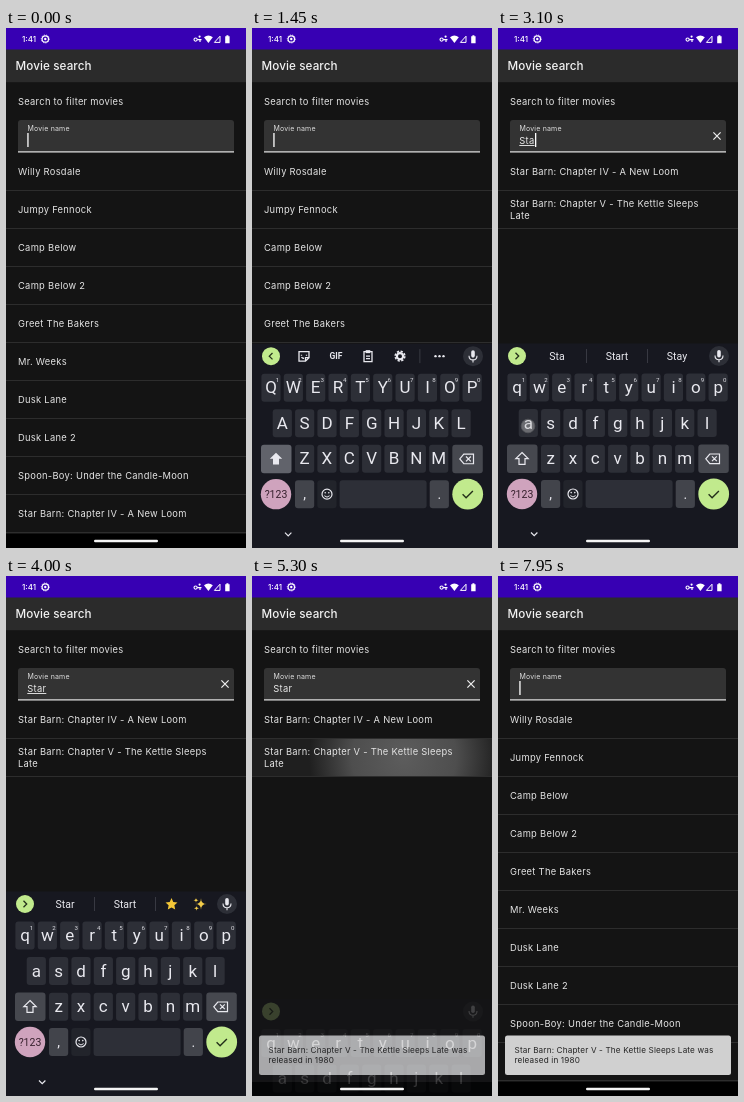
Recreate the animation shown at these times as an HTML page. Size 240 by 520 pixels, loop 8000 ms.

```html
<!DOCTYPE html>
<html lang="en">
<head>
<meta charset="utf-8">
<title>Movie search</title>
<style>
  html, body { margin: 0; height: 100%; overflow: hidden; background: #141414; }
  svg { display: block; width: 100%; height: 100%; }
  text { font-family: Inter, Roboto, sans-serif; white-space: pre; }
  .key { font-family: Roboto, sans-serif; text-anchor: middle; }
</style>
</head>
<body>
<svg id="stage" viewBox="0 0 240 520"></svg>
<script>
const LOOP = 8000, KB_HEIGHT = 204, ROW = 38, LIST_TOP = 125;
const TYPED = 'Star';
const MOVIES = [
  'Willy Rosdale', 'Jumpy Fennock', 'Camp Below', 'Camp Below 2', 'Greet The Bakers',
  'Mr. Weeks', 'Dusk Lane', 'Dusk Lane 2', 'Spoon-Boy: Under the Candle-Moon',
  'Star Barn: Chapter IV - A New Loom',
  'Star Barn: Chapter V - The Kettle Sleeps\nLate'
];
const KEY_TIMES = [2350, 2700, 3100, 3500];
const CARET_X = [21.9, 28.5, 32.2, 37.6, 41];
const SUGGESTIONS = [
  [], ['S', 'So', 'Sorry'], ['St', 'Still', 'Stop'], ['Sta', 'Start', 'Stay'], ['Star', 'Start']
];
const SELECT = 5100, CLEAR = 7600, DEBOUNCE = 170;
// start, end, x, y
const TOUCHES = [
  [950, 1400, 119, 119], [2300, 2600, 57, 398], [2650, 2900, 108, 362],
  [3050, 3300, 30, 398], [3450, 3750, 86, 362], [4950, 5280, 150, 181],
  [7550, 7930, 220, 112]
];

const clamp = v => Math.max(0, Math.min(1, v));
const ramp = (t, from, to) => clamp((t - from) / (to - from));
const rect = (x, y, w, h, fill, r = 0, extra = '') =>
  `<rect x="${x}" y="${y}" width="${w}" height="${h}" rx="${r}" fill="${fill}" ${extra}/>`;
const circle = (x, y, r, fill, extra = '') =>
  `<circle cx="${x}" cy="${y}" r="${r}" fill="${fill}" ${extra}/>`;
const text = (x, y, s, size, fill, spacing = 0, extra = '') =>
  `<text x="${x}" y="${y}" font-size="${size}" fill="${fill}" letter-spacing="${spacing}" ${extra}>${s}</text>`;
const label = (x, y, s, size, fill = '#e9e9ef') =>
  `<text class="key" x="${x}" y="${y}" font-size="${size}" fill="${fill}">${s}</text>`;
const line = (d, color = '#e9e9ef', width = 1.3) =>
  `<path d="${d}" fill="none" stroke="${color}" stroke-width="${width}"/>`;
const shape = (d, fill = '#e9e9ef') => `<path d="${d}" fill="${fill}"/>`;
const group = (content, transform, opacity = 1) =>
  `<g transform="${transform}" opacity="${opacity}">${content}</g>`;

function queryAt(t) {
  return t >= CLEAR ? '' : TYPED.slice(0, KEY_TIMES.filter(k => t >= k).length);
}

function statusBar() {
  return rect(0, 0, 240, 22, '#3700b3')
    + text(16, 14, '1:41', 8, '#fff', 0, 'font-weight="500"')
    + circle(39.3, 11, 3.2, 'none', 'stroke="#fff" stroke-width="1.2"')
    + circle(39.3, 11, 4, 'none', 'stroke="#fff" stroke-width=".8" stroke-dasharray="1.2 1.2"')
    + circle(39.3, 11, 1.2, '#fff')
    + circle(189.6, 11.6, 1.6, 'none', 'stroke="#fff" stroke-width="1.1"')
    + line('M191.2 11.6H195.5M194 11.6V14', '#fff', 1.2) + circle(193.6, 8.6, 1.1, '#fff')
    + shape('M202.4 15L198 9.2Q202.4 5.8 206.8 9.2Z', '#fff')
    + line('M208.4 14.4H214V8.2Z', '#fff', 1)
    + shape('M219.2 8.2h1.2v-1h2v1h1.2v7h-4.4z', '#fff');
}

function movieList(filter) {
  return MOVIES.filter(m => m.toLowerCase().includes(filter.toLowerCase())).map((m, i) => {
    const y = LIST_TOP + i * ROW, lines = m.split('\n');
    const first = y + 22 - (lines.length - 1) * 5.6;
    return lines.map((s, n) => text(12, first + n * 11.3, s, 9.34, '#e4e4e4', .29)).join('')
      + rect(0, y + ROW - 1, 240, 1, '#2d2d2d');
  }).join('');
}

function ripple(t) {
  const alpha = ramp(t, 4980, 5150) * (1 - ramp(t, 5250, 5600) * .9) * (t < 5620);
  if (!alpha) return '';
  const radius = 30 + 65 * ramp(t, 4980, 5300);
  return `<defs><radialGradient id="glow" gradientUnits="userSpaceOnUse" cx="152" cy="181" r="${radius}">
    <stop offset="0" stop-color="#666"/><stop offset=".55" stop-color="#555"/>
    <stop offset="1" stop-color="#555" stop-opacity="0"/></radialGradient></defs>`
    + rect(0, 163, 240, 37, '#2a2a2a', 0, `opacity="${alpha * .6}"`)
    + rect(0, 163, 240, 37, 'url(#glow)', 0, `opacity="${alpha}"`);
}

function caretVisible(t) {
  if (t < 950) return t < 300 || t >= 800;
  if (t < 2500) return t < 1800;
  if (t < 4000 || t >= CLEAR) return true;
  return Math.floor(t / 500) % 2 === 1;
}

function field(t, query, filter) {
  const composing = t < SELECT ? 'text-decoration="underline"' : '';
  return shape('M12 124V95q0-3 3-3H225q3 0 3 3V124Z', '#333')
    + rect(12, 123.3, 216, 1.2, '#e6e6e6')
    + text(21.5, 103, 'Movie name', 7, '#dedede', .18)
    + text(21.3, 116, query, 9.34, '#e8e8e8', .29, composing)
    + (caretVisible(t) ? rect(CARET_X[query.length] - .6, 105, 1.3, 14, '#fff') : '')
    + (filter ? line('M215.4 104.4l7.2 7.2m0-7.2l-7.2 7.2', '#f0f0f0', 1.2) : '');
}

function snackbar(t) {
  const p = ramp(t, 5140, 5290);
  if (!p) return '';
  const scale = .8 + .2 * p;
  return group(
    rect(7, 459.5, 226, 39.5, '#d0d0d0', 2.5)
    + text(16.5, 477.2, MOVIES[10].replace('\n', ' ') + ' was', 8.17, '#242424', .15)
    + text(16.5, 487.2, 'released in 1980', 8.17, '#242424', .15),
    `translate(120 479) scale(${scale}) translate(-120 -479)`, p);
}

function toolbarIcons() {
  return line('M47 323.5h10v6l-3.5 3.5h-6.5zM53.5 333v-3.5h3.5M49.5 326.5v1M54.5 326.5v1M49.5 329q1 1.5 2.5 1')
    + label(84, 331.3, '<tspan font-weight="700">GIF</tspan>', 8.5)
    + line('M112 323.5h8v10h-8zM114 328h4M114 330.5h4') + rect(113.7, 322, 4.6, 3, '#e9e9ef')
    + circle(148, 328, 3.1, 'none', 'stroke="#e9e9ef" stroke-width="2.2"')
    + circle(148, 328, 4.8, 'none', 'stroke="#e9e9ef" stroke-width="1.6" stroke-dasharray="2.3 1.47"')
    + rect(167.5, 321, .8, 14, '#41434b')
    + [183.5, 187.5, 191.5].map(x => circle(x, 328, 1.2, '#e9e9ef')).join('');
}

function star(x, y, r) {
  let d = '';
  for (let i = 0; i < 10; i++) {
    const a = i * Math.PI / 5, q = i % 2 ? r * .48 : r;
    d += (i ? 'L' : 'M') + (x + q * Math.sin(a)) + ' ' + (y - q * Math.cos(a));
  }
  return shape(d + 'Z', '#f3c637');
}

const sparkle = (x, y, r) =>
  shape(`M${x} ${y - r}Q${x} ${y} ${x + r} ${y}Q${x} ${y} ${x} ${y + r}Q${x} ${y} ${x - r} ${y}Q${x} ${y} ${x} ${y - r}Z`, '#f3cc4a');

function suggestions(query) {
  return SUGGESTIONS[query.length].map((s, i) => label(59 + i * 60, 331.8, s, 10.5)).join('')
    + rect(88, 321, .8, 14, '#41434b') + rect(149, 321, .8, 14, '#41434b')
    + (query === TYPED
      ? star(165.5, 328.4, 6.3) + sparkle(195, 328, 5.8) + sparkle(190, 324.2, 2.7) + sparkle(190.5, 332.2, 2.7)
      : '');
}

function keyRow(letters, x0, y, upper, digits) {
  return [...letters].map((c, i) => {
    const x = x0 + i * 22.35;
    return rect(x - 9.6, y - 14, 19.2, 28, '#2d2f37', 3)
      + label(x, y + 5.6, upper ? c.toUpperCase() : c, 17)
      + (digits ? label(x + 6.6, y - 5.5, (i + 1) % 10, 6.2, '#e0e0e6') : '');
  }).join('');
}

function keyboard(t, query) {
  const upper = !query, green = '#c1ea8d', dark = '#24301a';
  const arrow = 'M24 424.5l6.2 6.2h-3.2v5.6h-6v-5.6h-3.2z';
  return rect(0, 315.5, 240, 205, '#171820')
    + circle(19, 328, 9, green)
    + line(upper ? 'M20.5 324.8l-3.2 3.2 3.2 3.2' : 'M17.5 324.8l3.2 3.2-3.2 3.2', dark)
    + (upper ? toolbarIcons() : t < SELECT ? suggestions(query) : '')
    + circle(221, 328, 10, '#2d2f37')
    + rect(219.2, 322, 3.6, 7.5, '#e9e9ef', 1.8)
    + line('M217 327.5q0 4.2 4 4.2t4-4.2M221 331.7v2.6', '#e9e9ef', 1.1)
    + keyRow('qwertyuiop', 19, 359.5, upper, true)
    + keyRow('asdfghjkl', 30.3, 395, upper)
    + rect(9, 416.5, 30.5, 28.5, upper ? '#61636b' : '#46484f', 3)
    + (upper ? shape(arrow) : line(arrow + 'Z', '#e9e9ef', 1.2))
    + keyRow('zxcvbnm', 52.6, 430.7, upper)
    + rect(200.3, 416.5, 30.5, 28.5, '#46484f', 3)
    + line('M211.8 426h9.7v9.6h-9.7l-4-4.8zM214 428.4l4.8 4.8m0-4.8l-4.8 4.8', '#e9e9ef', 1.2)
    + circle(24, 466, 15.2, '#cfa3bd') + label(24, 469.8, '?123', 10.5, '#36202d')
    + rect(43, 452, 19.2, 28, '#42444b', 3) + label(52.6, 471, ',', 14)
    + rect(65.3, 452, 19.2, 28, '#22242b', 3)
    + circle(75, 466, 5, 'none', 'stroke="#e9e9ef" stroke-width="1.2"')
    + circle(73.2, 464.6, .8, '#e9e9ef') + circle(76.8, 464.6, .8, '#e9e9ef')
    + line('M72.4 467.6q2.6 2.8 5.2 0', '#e9e9ef', 1)
    + rect(87.6, 452, 87, 28, '#2d2f37', 3)
    + rect(177.7, 452, 19.2, 28, '#42444b', 3) + label(187.3, 471, '.', 14)
    + circle(215.7, 466, 15.4, green) + line('M210.6 466.2l3.5 3.5 6.8-6.8', dark, 1.4)
    + line('M33 504.5l3.2 3.2 3.2-3.2', '#e9e9ef', 1.2);
}

function keyboardLayer(t, query) {
  if (t < 1110 || t >= 5400) return '';
  const opening = ramp(t, 1110, 1460), closing = ramp(t, SELECT, 5400);
  const shift = KB_HEIGHT * ((1 - opening) ** 2 + closing ** 1.6);
  const opacity = Math.min(1, opening * 1.6) * (1 - closing) ** 1.4;
  return group(keyboard(t, query), `translate(0 ${shift})`, opacity);
}

function touches(t) {
  return TOUCHES.map(([from, to, x, y]) => {
    const alpha = ramp(t, from - 50, from + 50) * (1 - ramp(t, to - 250, to)) * (t >= from);
    return alpha ? circle(x, y, 6.8, '#c8c8c8', `opacity="${alpha * .5}" stroke="#999" stroke-width=".8"`) : '';
  }).join('');
}

function scene(t) {
  const query = queryAt(t), filter = queryAt(t - DEBOUNCE);
  return rect(0, 0, 240, 520, '#141414')
    + statusBar()
    + rect(0, 21.5, 240, 32.7, '#2b2b2b')
    + text(9.5, 42.2, 'Movie search', 11.7, '#f2f2f2', .09, 'font-weight="500"')
    + text(12, 76.5, 'Search to filter movies', 9.34, '#e4e4e4', .29)
    + ripple(t)
    + movieList(filter)
    + field(t, query, filter)
    + rect(0, 506, 240, 14, '#000')
    + snackbar(t)
    + keyboardLayer(t, query)
    + rect(88, 511.8, 64, 2.4, '#f4f4f4', 1.2)
    + touches(t);
}

const stage = document.getElementById('stage');
const start = performance.now();
function draw() {
  stage.innerHTML = scene((performance.now() - start) % LOOP);
  requestAnimationFrame(draw);
}
draw();
</script>
</body>
</html>
```
